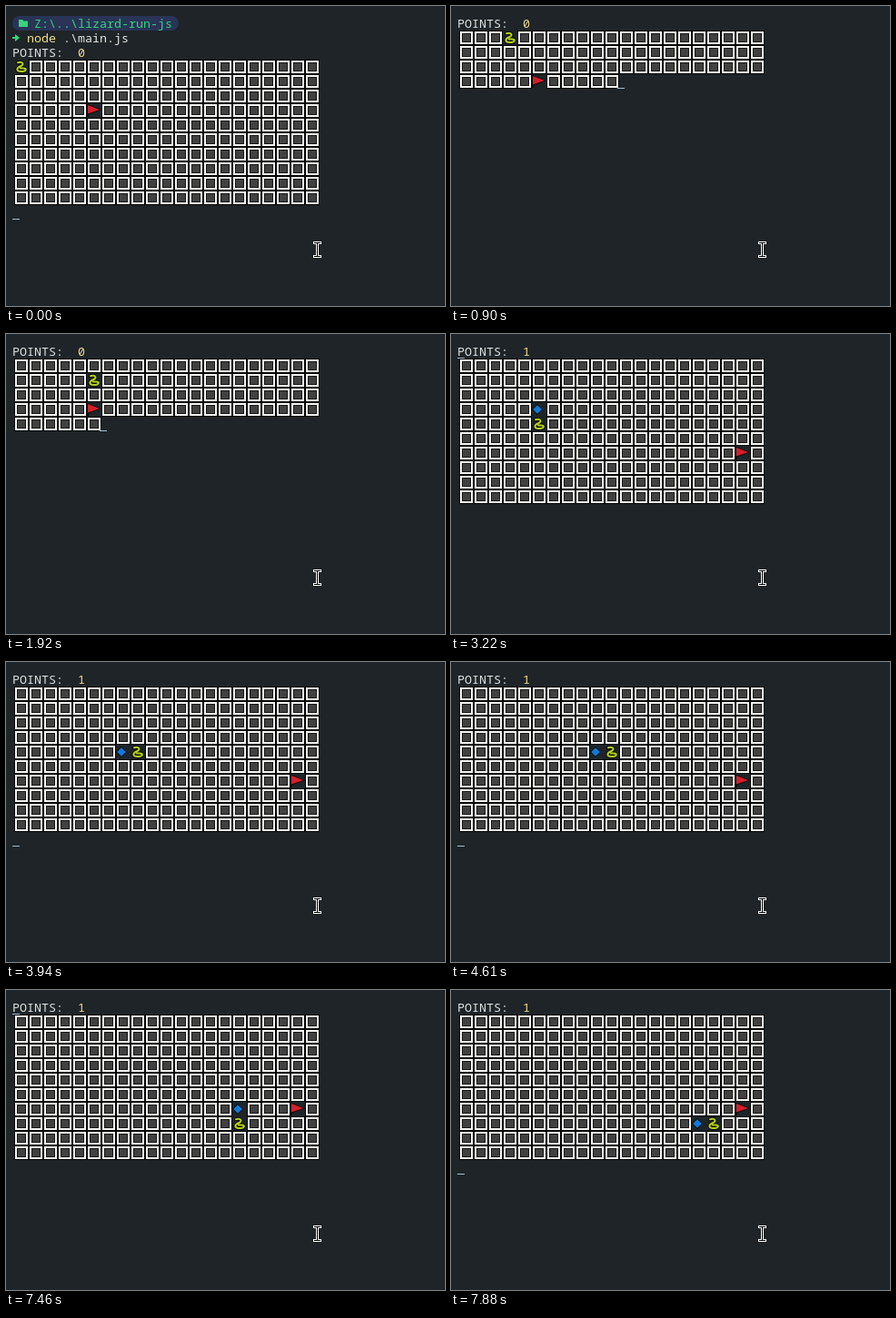
These frames come from a looping animation (483 px wide and 330 px high, 8000 ms). An HTML page with a canvas:

```html
<!DOCTYPE html>
<html lang="en">
<head>
<meta charset="utf-8">
<title>Terminal game</title>
<style>
  html, body { margin: 0; width: 100%; height: 100%; overflow: hidden; background: #1e2427; }
  canvas { display: block; width: 483px; height: 330px; }
</style>
</head>
<body>
<canvas id="stage"></canvas>
<script>
const LOOP = 8000, WIDTH = 483, HEIGHT = 330;
const COLS = 21, ROWS = 10, CELL = 16, CHAR = 8, LEFT = 7, TOP = 11;
const BG = '#1e2427', FONT = '13.33px "Noto Sans Mono", "DejaVu Sans Mono", monospace';
const ROUTE = 'R'.repeat(5) + 'D'.repeat(4) + 'R'.repeat(10) + 'D'.repeat(3) + 'RR';
const EATEN = 8;

// Each redraw: start, end, cursor jumps home first, cells written part-way.
const STEPS = [
  [240, 270, 1], [570, 570], [900, 940, 0, 74], [1210, 1270, 1, 67],
  [1550, 1580, 1], [1880, 1950, 1, 90], [2230, 2260, 1], [2560, 2590, 1],
  [2890, 2930, 1], [3220, 3300, 1, 100], [3560, 3630, 1, 80], [3910, 3940, 0, 95],
  [4240, 4310, 0, 30], [4580, 4610, 1], [4910, 4950, 0, 95], [5210, 5280, 1],
  [5560, 5590, 1], [5890, 5890], [6200, 6230, 1], [6530, 6570, 0, 126],
  [6830, 6900, 1, 90], [7160, 7200, 0, 120], [7460, 7530, 1, 90], [7810, 7880, 1, 90]
];

const places = [[0, 0]];
for (const turn of ROUTE) {
  const [x, y] = places[places.length - 1];
  places.push(turn === 'R' ? [x + 1, y] : [x, y + 1]);
}

const canvas = document.getElementById('stage');
const ctx = canvas.getContext('2d');
const scale = window.devicePixelRatio || 1;
canvas.width = WIDTH * scale;
canvas.height = HEIGHT * scale;
ctx.scale(scale, scale);

const snakePath = new Path2D('M4 3.2 C10 1.6 11 5.5 7.5 7 C1.5 9.5 2.5 13 7.5 13 C14 13 14 9.7 10.5 9.5 H7');

function rect(color, x, y, w, h) {
  ctx.fillStyle = color;
  ctx.fillRect(x, y, w, h);
}

function shape(color, points) {
  ctx.fillStyle = color;
  ctx.beginPath();
  points.forEach(([x, y]) => ctx.lineTo(x, y));
  ctx.closePath();
  ctx.fill();
}

function text(value, column, line, color, weight = 400) {
  ctx.font = `${weight} ${FONT}`;
  ctx.fillStyle = color;
  ctx.fillText(value, LEFT + column * CHAR, TOP + line * CELL + 13);
}

function cursor(column, line) {
  rect('#a3bdd6', LEFT + column * CHAR, TOP + line * CELL + 15, CHAR, 1);
}

const glyphs = {
  tile() {
    rect('#050505', 0, 0, 16, 16);
    rect('#f4f4f2', 1, 1, 14, 14);
    rect('#161616', 3, 3, 10, 10);
    rect('#414141', 4, 4, 8, 8);
  },
  snake() {
    ctx.lineCap = ctx.lineJoin = 'round';
    for (const [color, width] of [['#0b0d05', 4], ['#b4d01c', 2]]) {
      ctx.strokeStyle = color;
      ctx.lineWidth = width;
      ctx.stroke(snakePath);
    }
  },
  tail() {
    shape('#080c10', [[6, 2], [12, 8], [6, 14], [0, 8]]);
    shape('#0f7bd9', [[6, 3.2], [10.8, 8], [6, 12.8], [1.2, 8]]);
  },
  flag() {
    rect('#0a0a0a', 0, 1, 2, 14);
    shape('#0a0a0a', [[0, 1], [16, 7], [0, 13]]);
    shape('#d3202b', [[1, 2], [14, 7], [1, 11.5]]);
  }
};

function drawPrompt() {
  ctx.fillStyle = '#293457';
  ctx.beginPath();
  ctx.roundRect(7, 11, 183, 16, 8);
  ctx.fill();
  shape('#34d57c', [[14, 15], [18, 15], [19.5, 16.5], [24, 16.5], [24, 23], [14, 23]]);
  text('Z:\\..\\lizard-run-js', 3, 0, '#34d57c');
  rect('#34d57c', 7, 34, 5, 2);
  shape('#34d57c', [[10, 31], [15, 35], [10, 39]]);
  text('node', 2, 1, '#f0e083');
  text('.\\main.js', 7, 1, '#e4e6e6');
}

function drawGame(index, line, count) {
  text('POINTS:', 0, line, '#e0e3e3');
  text(index > EATEN ? '1' : '0', 9, line, '#eed991');
  const same = (a, b) => a && a[0] === b[0] && a[1] === b[1];
  const head = places[index];
  const tail = index > EATEN ? places[index - 1] : null;
  const flag = index < EATEN ? [5, 3] : [19, 6];
  for (let i = 0; i < count; i++) {
    const spot = [i % COLS, Math.floor(i / COLS)];
    const kind = same(head, spot) ? 'snake' : same(tail, spot) ? 'tail'
      : same(flag, spot) ? 'flag' : 'tile';
    ctx.save();
    ctx.translate(LEFT + 2 + spot[0] * CELL, TOP + (line + 1 + spot[1]) * CELL);
    glyphs[kind]();
    ctx.restore();
  }
}

function drawPointer() {
  for (const [color, inset] of [['#fff', 0], ['#000', 1]]) {
    const thick = 3 - 2 * inset;
    rect(color, 338 + inset, 259 + inset, 9 - 2 * inset, thick);
    rect(color, 338 + inset, 274 + inset, 9 - 2 * inset, thick);
    rect(color, 341 + inset, 259 + inset, thick, 18 - 2 * inset);
  }
}

function stateAt(time) {
  const full = COLS * ROWS;
  const index = STEPS.filter(([start]) => start <= time).length;
  if (!index) return { index, count: full };
  const [start, end, home, part] = STEPS[index - 1];
  if (time >= end) return { index, count: full };
  if (home && (!part || time < start + 40)) return { index: index - 1, count: full, home };
  return { index, count: part + (!home && time >= start + 40 ? 90 : 0) };
}

function render(time) {
  const { index, count, home } = stateAt(time);
  const line = index ? 0 : 2;
  rect(BG, 0, 0, WIDTH, HEIGHT);
  if (!index) drawPrompt();
  drawGame(index, line, count);
  if (home) cursor(0, 0);
  else if (count === COLS * ROWS) cursor(0, line + ROWS + 1);
  else {
    const row = Math.floor((count - 1) / COLS);
    cursor((count - row * COLS) * 2, line + 1 + row);
  }
  drawPointer();
}

function tick() {
  render(performance.now() % LOOP);
  requestAnimationFrame(tick);
}
tick();
</script>
</body>
</html>
```
